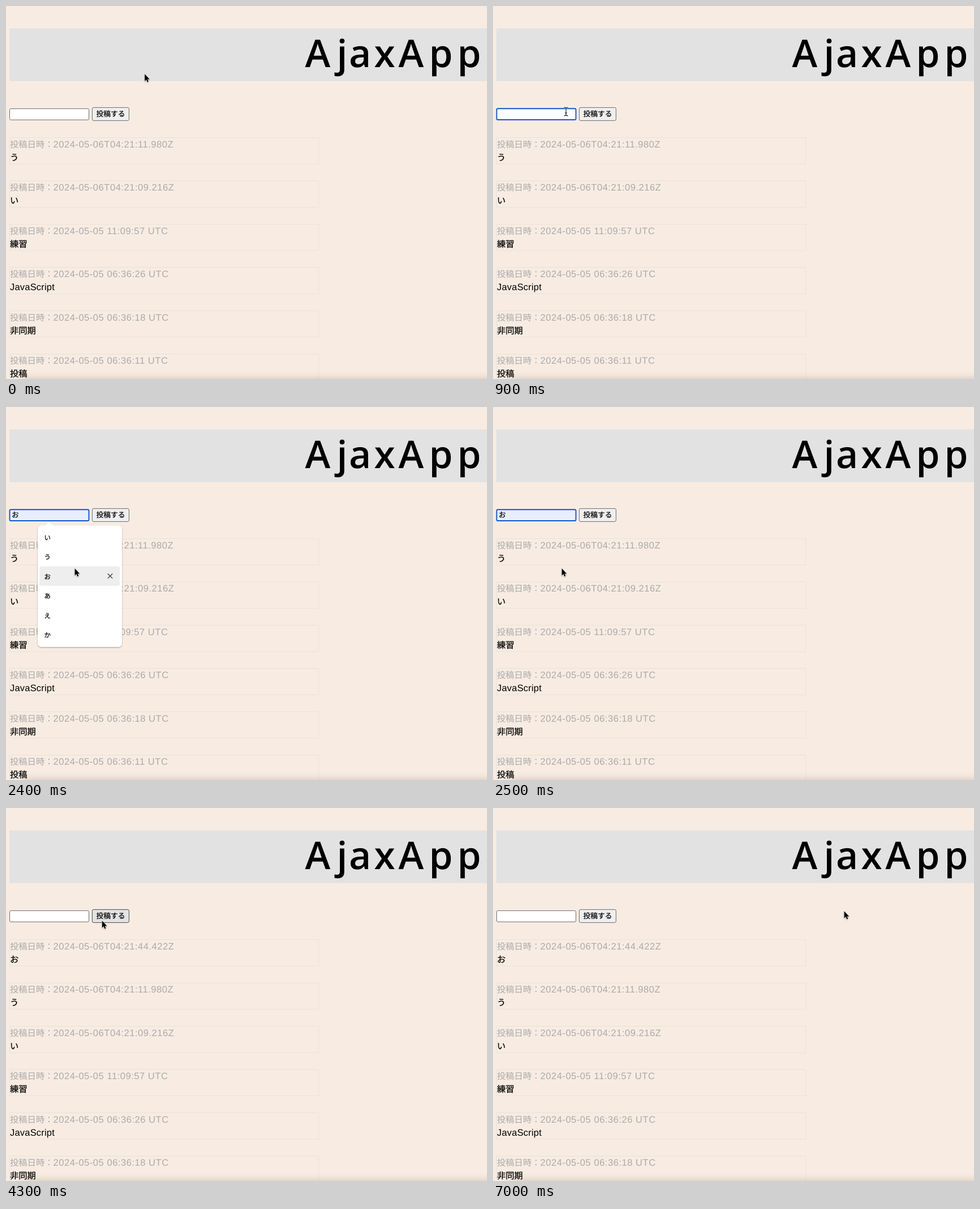
An HTML page that plays this animation: 850x659 px, repeating every 7100 ms.

```html
<!DOCTYPE html>
<html lang="ja">
<head>
<meta charset="utf-8">
<title>AjaxApp</title>
<style>
  html, body { margin: 0; width: 100%; height: 100%; overflow: hidden; background: #f8ece2; }
  svg { display: block; width: 850px; height: 659px; }
  text { font-family: "Noto Sans CJK JP", "Noto Sans CJK", sans-serif; font-size: 15.3px; fill: #000; white-space: pre; text-rendering: geometricPrecision; }
  .title { font: 600 67.5px "Open Sans", sans-serif; }
  .date, .stamp { fill: #aaa; }
  .stamp { font: 16.5px "Liberation Sans", Arial, sans-serif; letter-spacing: .54px; }
  .latin { font: 16.5px "Liberation Sans", Arial, sans-serif; letter-spacing: .2px; }
  .body, .control, .option { stroke: #000; stroke-width: .25px; }
  .control { font-size: 12.75px; }
  .option { font-size: 11.5px; }
</style>
</head>
<body>
<svg viewBox="0 0 850 659">
  <defs>
    <filter id="soft" x="-20%" y="-300%" width="140%" height="700%"><feGaussianBlur stdDeviation="8"/></filter>
    <filter id="lift" x="-20%" y="-20%" width="140%" height="140%">
      <feDropShadow dx="0" dy="1" stdDeviation="1.3" flood-opacity=".35"/>
    </filter>
  </defs>
  <rect width="850" height="659" fill="#f8ece2"/>
  <rect x="6" y="39.5" width="844" height="93.3" fill="#e2e2e2"/>
  <text class="title" x="528.5 584.5 606 650.5 693.5 747.5 797.5" y="107.7">AjaxApp</text>

  <rect id="field" x="6.5" width="140" height="19.8" rx="2"/>
  <text id="value" class="control" x="10" y="195.2"></text>
  <rect id="button" x="152.4" y="179.4" width="65" height="23" rx="2.5"/>
  <text class="control" x="159.5" y="195.2">投稿する</text>

  <g id="posts"></g>
  <rect x="30" y="660" width="870" height="20" fill="#4a2c18" opacity=".26" filter="url(#soft)"/>

  <g id="popup">
    <path filter="url(#lift)" fill="#fff" d="M63 209.5H68L76 203L84 209.5H198a7 7 0 0 1 7 7V417a7 7 0 0 1-7 7H63a7 7 0 0 1-7-7V216.5a7 7 0 0 1 7-7Z"/>
    <g id="highlight">
      <rect x="59.5" width="141.5" height="34.5" rx="3" fill="#eee"/>
      <path d="M179.8 13l8.4 8.4m0-8.4l-8.4 8.4" stroke="#333" stroke-width="1.2"/>
    </g>
    <g id="options"></g>
  </g>

  <g id="arrow">
    <path transform="translate(.6 .8) scale(.94)" filter="url(#lift)" d="M0 0V13.2L3 10.4L5 15L7.2 14.1L5.2 9.7H9.3Z" stroke="#fff" paint-order="stroke"/>
  </g>
  <g id="beam" fill="none">
    <path d="M-3.5-7.5Q0-7.5 0-5.5Q0-7.5 3.5-7.5M0-6V6M-3.5 7.5Q0 7.5 0 5.5Q0 7.5 3.5 7.5M-2 2.5H2" stroke="#fff" stroke-width="2.4" opacity=".7"/>
    <path d="M-3.5-7.5Q0-7.5 0-5.5Q0-7.5 3.5-7.5M0-6V6M-3.5 7.5Q0 7.5 0 5.5Q0 7.5 3.5 7.5M-2 2.5H2" stroke="#111" stroke-width="1.1"/>
  </g>
</svg>
<script>
const LOOP = 7100, STEP = 100;
const FOCUS = 900, OPEN = 1200, CHOOSE = 2500, SUBMIT = 3300, POSTED = 4300;
const ROW_TOP = 213, ROW_HEIGHT = 34.5;

const options = ['い', 'う', 'お', 'あ', 'え', 'か'];
const posts = [
  ['2024-05-06T04:21:44.422Z', 'お'],
  ['2024-05-06T04:21:11.980Z', 'う'],
  ['2024-05-06T04:21:09.216Z', 'い'],
  ['2024-05-05 11:09:57 UTC', '練習'],
  ['2024-05-05 06:36:26 UTC', 'JavaScript'],
  ['2024-05-05 06:36:18 UTC', '非同期'],
  ['2024-05-05 06:36:11 UTC', '投稿']
];

const linear = u => u;
const easeIn = u => u * u;
const easeOut = u => u * (2 - u);
const smooth = u => u * u * (3 - 2 * u);

// Cursor stops: time, x, y, easing towards this stop
const path = [
  [0, 244.5, 119.5, linear],
  [600, 129, 186.5, smooth],
  [1500, 129, 186.5, linear],
  [1700, 128.5, 212, easeIn],
  [2200, 121, 284.5, easeOut],
  [2500, 121, 284.5, linear],
  [3100, 169, 198.5, smooth],
  [6200, 169.5, 198.5, linear],
  [7000, 620, 181.5, smooth],
  [LOOP, 620, 181.5, linear]
];

const $ = id => document.getElementById(id);
const set = (id, attrs) => {
  for (const name in attrs) $(id).setAttribute(name, attrs[name]);
};
const show = (id, visible) => set(id, { display: visible ? 'inline' : 'none' });

function postMarkup([stamp, body], i) {
  const y = 232 + 76.5 * i;
  const kind = /^[A-Z]/i.test(body) ? 'latin' : 'body';
  return `<rect x="6.5" y="${y + .5}" width="546" height="46.5" fill="none" stroke="#e9e1da"/>
    <text class="date" x="7" y="${y + 17.7}">投稿日時：</text>
    <text class="stamp" x="83.5" y="${y + 17.7}">${stamp}</text>
    <text class="${kind}" x="7" y="${y + 40.8}">${body}</text>`;
}

function cursorAt(t) {
  const i = Math.max(1, path.findIndex(stop => stop[0] >= t));
  const [t0, x0, y0] = path[i - 1];
  const [t1, x1, y1, ease] = path[i];
  const u = ease((t - t0) / (t1 - t0));
  return [x0 + (x1 - x0) * u, y0 + (y1 - y0) * u];
}

const inside = (x, y, left, top, right, bottom) => x >= left && x <= right && y >= top && y <= bottom;

let firstPost = -1;
function showPosts(first) {
  if (first === firstPost) return;
  firstPost = first;
  $('posts').innerHTML = posts.slice(first, first + 6).map(postMarkup).join('');
}

function draw(t) {
  const [x, y] = cursorAt(t);
  const open = t >= OPEN && t < CHOOSE;
  const row = open ? Math.floor((y - ROW_TOP) / ROW_HEIGHT) : -1;
  const chosen = t >= CHOOSE && t < POSTED;
  const text = chosen ? 'お' : options[row] || '';
  const focused = t >= FOCUS && t < SUBMIT;
  const overField = inside(x, y, 6, 181, 147, 202);
  const overButton = inside(x, y, 152, 179, 218, 203);

  set('field', {
    y: focused ? 181.2 : 181.4,
    fill: text ? '#e8eefc' : '#fff',
    stroke: focused ? '#0f57cc' : overField ? '#444' : '#6c6c6c',
    'stroke-width': focused ? 1.9 : 1
  });
  $('value').textContent = text;
  set('button', {
    fill: overButton ? '#e3e3e3' : '#efefef',
    stroke: overButton ? '#4a4a4a' : '#6c6c6c'
  });

  showPosts(t < POSTED ? 1 : 0);
  show('popup', open);
  show('highlight', row >= 0);
  set('highlight', { transform: `translate(0 ${ROW_TOP - .5 + ROW_HEIGHT * row})` });

  show('beam', overField);
  show('arrow', !overField);
  set(overField ? 'beam' : 'arrow', { transform: `translate(${x} ${y})` });
}

$('options').innerHTML = options.map((label, i) =>
  `<text class="option" x="67.5" y="${234.8 + ROW_HEIGHT * i}">${label}</text>`).join('');

const start = performance.now();
function tick() {
  const t = (performance.now() - start) % LOOP;
  draw(Math.floor(t / STEP) * STEP);
  requestAnimationFrame(tick);
}
tick();
</script>
</body>
</html>
```
